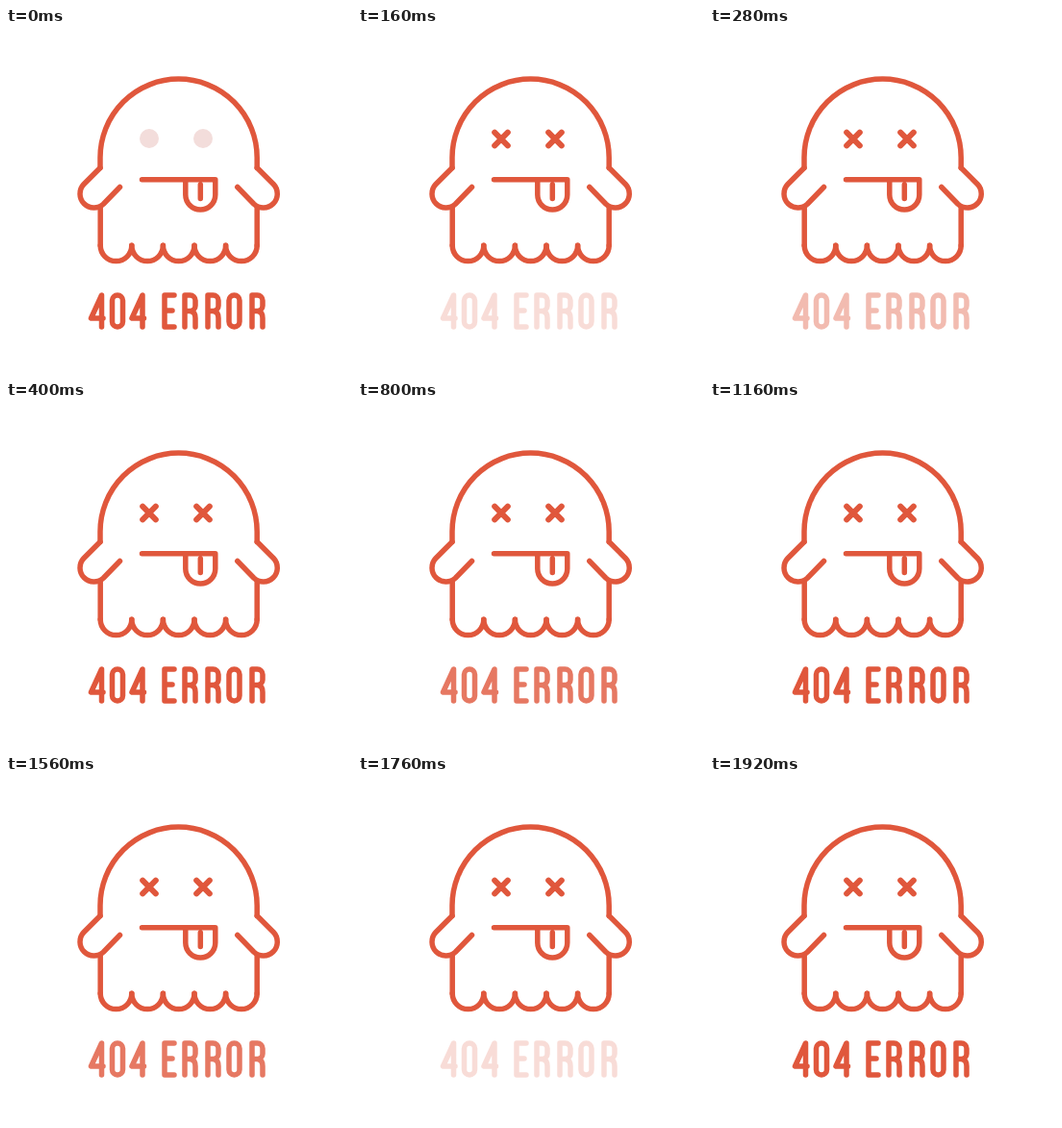
An HTML page for the animation above (2000 ms loop, 360x360 px).

```html
<!DOCTYPE html>
<html lang="en">
<head>
<meta charset="utf-8">
<title>404 error</title>
<style>
  html, body { margin: 0; width: 100%; height: 100%; overflow: hidden; background: #fff; }
  svg { display: block; width: 100vw; height: 100vh; }
  .line { fill: none; stroke: #e0573c; stroke-width: 5.5; stroke-linecap: round; stroke-linejoin: round; }
  #crosses { stroke-width: 6; }
</style>
</head>
<body>
<svg viewBox="0 0 360 360">
  <defs>
    <path id="cross" d="M-6.8-6.8 6.8 6.8M6.8-6.8-6.8 6.8"/>
    <path id="four" d="M13.5 311V278L2.5 302H15"/>
    <rect id="zero" x="3" y="278" width="11" height="33" rx="5.5"/>
    <path id="e" d="M13 278H3V311H13M3 294H11"/>
    <path id="r" d="M3 311V278H8.500a5.500 5.500 0 0 1 5.500 5.500V289a5.500 5.500 0 0 1-5.500 5.500H3M8.500 294.500C13 295 14 298 14 302V311"/>
    <path id="arm" d="M98 145.500 81 162.500A14.500 14.500 0 0 0 101.500 183L118.500 165.500"/>
    <path id="scallop" d="M98.200 226.300a16.300 16.300 0 0 0 32.600 0"/>
  </defs>

  <g class="line">
    <path d="M98 145.500V134.700a81.600 81.600 0 0 1 163.200 0V145.500M98.200 187V226.300M261.200 187V226.300"/>
    <use href="#arm"/>
    <use href="#arm" transform="matrix(-1 0 0 1 359.300 0)"/>
    <use href="#scallop"/>
    <use href="#scallop" x="32.600"/>
    <use href="#scallop" x="65.200"/>
    <use href="#scallop" x="97.800"/>
    <use href="#scallop" x="130.400"/>
    <path d="M141.500 157.800H217.800V173.600a15.500 15.500 0 0 1-31 0V157.800M202.300 163V177.500"/>
  </g>

  <g id="dots" fill="#f3dddb">
    <circle cx="149" cy="115" r="10"/>
    <circle cx="205" cy="115" r="10"/>
  </g>
  <g id="crosses" class="line">
    <use href="#cross" x="149" y="115.500"/>
    <use href="#cross" x="205" y="115.500"/>
  </g>

  <g id="label" class="line" role="img" aria-label="404 ERROR">
    <use href="#four" x="86"/>
    <use href="#zero" x="107.500"/>
    <use href="#four" x="128.500"/>
    <use href="#e" x="162"/>
    <use href="#r" x="183"/>
    <use href="#r" x="207"/>
    <use href="#zero" x="229"/>
    <use href="#r" x="253"/>
  </g>
</svg>
<script>
  const LOOP = 2000, STEP = 40, BLINK = 400, PERIOD = 760;
  const [dots, crosses, label] = ['dots', 'crosses', 'label'].map(id => document.getElementById(id));

  function draw() {
    const time = Math.floor(performance.now() % LOOP / STEP) * STEP;
    const phase = Math.min(time % PERIOD / BLINK, 1);
    label.style.opacity = Math.abs(1 - 2 * phase);
    dots.style.display = time === 0 ? '' : 'none';
    crosses.style.display = time === 0 ? 'none' : '';
    requestAnimationFrame(draw);
  }
  draw();
</script>
</body>
</html>
```
